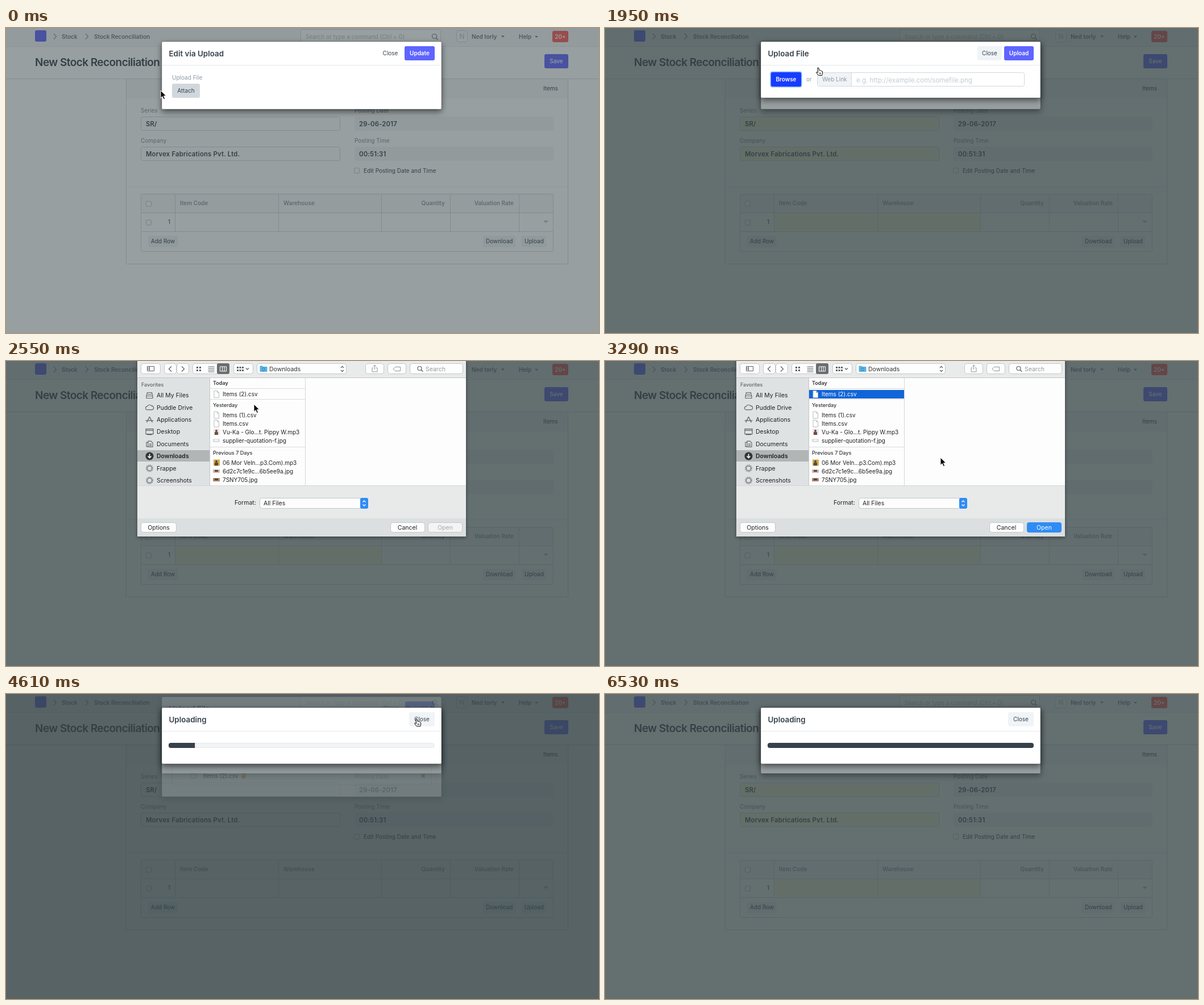
An HTML page that plays this animation: 1043x537 px, repeating every 8 s.

```html
<!DOCTYPE html>
<html lang="en">
<head>
<meta charset="utf-8">
<title>Upload stock items</title>
<style>
html, body { margin: 0; width: 100%; height: 100%; overflow: hidden; background: #fff; }
svg { display: block; width: 100%; height: 100%; }
text { font-family: Inter, "Open Sans", sans-serif; white-space: pre; }
</style>
</head>
<body>
<svg id="stage" viewBox="0 0 1043 537" xmlns="http://www.w3.org/2000/svg"></svg>
<script>
const INK = '#36414c', MUTED = '#8d99a6', LINE = '#d1d8dd', PALE = '#f5f7fa', SOFT = '#f0f4f7', BLUE = '#5e64ff';
const LOOP = 8000;

// drawing helpers; text is placed by its vertical centre
const rect = (x, y, w, h, fill, more = '') => `<rect x="${x}" y="${y}" width="${w}" height="${h}" fill="${fill}" ${more}/>`;
const box = (x, y, w, h, fill = '#fff', stroke = LINE, r = 3) =>
  rect(x + .5, y + .5, w - 1, h - 1, fill, `stroke="${stroke}" rx="${r}"`);
const path = (d, stroke, width = 1, fill = 'none') =>
  `<path d="${d}" stroke="${stroke}" stroke-width="${width}" fill="${fill}"/>`;
const text = (x, y, s, { size = 10, fill = INK, weight = 400, anchor = 'start', more = '' } = {}) =>
  `<text x="${x}" y="${y + size * .36}" font-size="${size}" fill="${fill}" font-weight="${weight}" text-anchor="${anchor}" ${more}>${s}</text>`;
const bold = (x, y, s, o = {}) => text(x, y, s, { weight: 600, ...o });
const group = (id, body, more = '') => `<g id="${id}" ${more}>${body}</g>`;
const hline = (x1, x2, y, c = LINE) => path(`M${x1} ${y}H${x2}`, c);
const vline = (x, y1, y2, c = LINE) => path(`M${x} ${y1}V${y2}`, c);
const caret = (x, y, c, w = 6) => `<path d="M${x} ${y}h${w}l${-w / 2} ${w / 2}z" fill="${c}"/>`;
const check = (x, y) => box(x, y, 10, 10, '#fff', '#b8c2ca', 2);
const button = (x, y, w, label, fill, color = INK, weight = 400, id = '') =>
  rect(x, y, w, 25, fill, `rx="3" ${id && `id="${id}"`}`) +
  text(x + w / 2, y + 12.2, label, { fill: color, weight, anchor: 'middle' });
const lens = (x, y, r, c) => `<circle cx="${x}" cy="${y}" r="${r}" fill="none" stroke="${c}" stroke-width="1.2"/>` +
  path(`M${x + r * .7} ${y + r * .7}l3.4 3.4`, c, 1.4);

function page() {
  const nav = rect(0, 0, 1043, 33, PALE) + hline(0, 1043, 32.5, '#e3e8ec') +
    rect(51, 4, 20, 20, BLUE, 'rx="3"') +
    path('M84 10l4.5 5l-4.5 5M140 10l4.5 5l-4.5 5', MUTED, 1.2) +
    bold(98, 15, 'Stock', { fill: '#6c7680' }) + bold(155, 15, 'Stock Reconciliation', { fill: '#6c7680' }) +
    box(518, 2, 247, 25) + text(527, 15, 'Search or type a command (Ctrl + G)', { fill: '#b3bcc4' }) + lens(753.5, 14.5, 4, '#6c7680') +
    box(792, 4, 20, 21, '#fafbfc') + text(802, 15, 'N', { size: 12, fill: '#b3bcc4', anchor: 'middle' }) +
    bold(819, 15, 'Ned torly', { fill: '#6c7680' }) + caret(871, 13.5, '#6c7680') +
    bold(902, 15, 'Help', { fill: '#6c7680' }) + caret(930, 14, '#6c7680') +
    rect(961, 5, 28, 20, '#ff5858', 'rx="3"') + bold(975, 15, '20+', { fill: '#fff', anchor: 'middle' });
  const head = bold(51, 60, 'New Stock Reconciliation', { size: 19, more: 'letter-spacing="-.55"' }) +
    button(947, 46, 42, 'Save', BLUE, '#fff', 500) + hline(0, 1043, 89.5);
  const card = rect(212, 90, 776, 34, PALE) + path('M211.5 90V415.5H988.5V90', LINE) +
    text(945, 106, 'Items') + hline(212, 988, 279.5, '#ebeff2');
  const value = { size: 11.3, more: 'letter-spacing=".2"' };
  const label = { fill: '#7f8b97' };
  const form = text(237, 145, 'Series', label) + text(237, 198, 'Company', label) +
    text(613, 145, 'Posting Date', label) + text(613, 198, 'Posting Time', label) +
    [156, 209].map(y => box(237, y, 351, 25, 'inherit') + rect(613, y, 350, 25, '#f3f5f8', 'rx="3"')).join('') +
    bold(246, 168.5, 'SR/', value) + bold(246, 222, 'Morvex Fabrications Pvt. Ltd.', value) +
    bold(621, 168.5, '29-06-2017', value) + bold(621, 221.5, '00:51:31', value) +
    check(612, 246) + text(629, 251, 'Edit Posting Date and Time');
  const th = { fill: MUTED };
  const table = rect(237, 293, 726, 32, '#f7f9fb') +
    rect(298, 326, 181, 32, 'inherit') + rect(480, 326, 180, 32, 'inherit') +
    box(237, 292, 726, 102, 'none') + hline(237, 963, 325.5) + hline(237, 963, 358.5) +
    [297.5, 479.5, 660.5, 781.5, 902.5].map(x => vline(x, 292, 358)).join('') +
    check(246, 304.5) + check(246, 337.5) + text(289, 341.5, '1', { anchor: 'end' }) +
    bold(306, 308, 'Item Code', th) + bold(488, 308, 'Warehouse', th) +
    bold(772, 308, 'Quantity', { ...th, anchor: 'end' }) + bold(893, 308, 'Valuation Rate', { ...th, anchor: 'end' }) +
    caret(945, 339, '#b8c2ca', 9) +
    rect(250, 366, 52, 20, SOFT, 'rx="3"') + rect(839, 366, 57, 20, SOFT, 'rx="3"') + rect(907, 366, 43, 20, SOFT, 'rx="3"') +
    text(255, 375.5, 'Add Row') + text(844, 375.5, 'Download') + text(912, 375.5, 'Upload');
  return rect(0, 0, 1043, 537, '#fff') + nav + head + card + form + table;
}

const shade = id => rect(0, 0, 1043, 537, '#334143', `id="${id}" opacity="0"`);
const frame = (title, bottom, id) =>
  rect(274, 24, 492, bottom - 24, '#fff', `id="${id}" rx="2" stroke="#000" stroke-opacity=".25" filter="url(#shadow)"`) +
  bold(286.5, 45, title, { size: 13.4 }) + hline(274, 766, 65.5, '#e3e8ec');

const editModal = () => frame('Edit via Upload', 143, 'editFrame') +
  button(654, 32, 44, 'Close', '#fff') + button(701, 32, 53, 'Update', BLUE, '#fff', 600) +
  text(292, 87, 'Upload File', { fill: MUTED }) + button(292, 98, 49, 'Attach', LINE);

const uploadModal = () => frame('Upload File', 123, 'uploadFrame') +
  button(655, 32, 43, 'Close', SOFT, INK, 400, 'uploadClose') + button(702, 32, 52, 'Upload', BLUE, '#fff', 600) +
  group('pick',
    rect(290.5, 76.5, 56, 28, '#7fb4f5', 'rx="4" id="ring"') + button(292, 78, 53, 'Browse', BLUE, '#fff', 600, 'browse') +
    text(354, 84 + 6.5, 'or', { fill: MUTED }) + box(373, 78, 365, 25) +
    rect(374, 79, 59, 23, SOFT) + vline(433.5, 78, 103) + text(382, 90.5, 'Web Link', { fill: MUTED }) +
    text(442, 91.5, 'e.g. http://example.com/somefile.png', { size: 11.5, fill: '#c5cbd0' })) +
  group('picked',
    button(292, 78, 53, 'Browse', '#7683f4', '#2f3a52') + box(292, 113, 456, 67) + hline(292, 748, 146.5) +
    text(306, 130, 'Public') + text(347, 130, 'Filename') + check(324, 158) + text(347, 163.5, 'Items (2).csv') +
    rect(414.5, 162.5, 7, 5, '#f5a033', 'rx="1"') + path('M416 163v-2a2 2 0 0 1 4 0v2', '#f5a033', 1.3) +
    path('M731 160.5l5.4 5.4m0 -5.4l-5.4 5.4', MUTED, 2.2));

const progressModal = () => frame('Uploading', 123, 'progressFrame') + button(709, 32, 45, 'Close', SOFT) +
  box(286, 86, 468, 9, '#f2f4f5', '#e6eaed', 4) +
  '<clipPath id="track"><rect x="286" y="86" width="468" height="9" rx="4"/></clipPath>' +
  rect(286, 86, 0, 9, INK, 'id="bar" clip-path="url(#track)"');

function fileDialog() {
  const grey = '#5f6366', edge = '#c4c7c8', ui = 10.5;
  const push = (x, y, w, h = 19, fill = '#fdfdfd') => box(x, y, w, h, fill, edge, 4);
  const icons = [
    y => path(`M247 ${y + 1}l1.5 -6h8l1.5 6v4h-11zM247 ${y + 1}h11M249 ${y - 2}h7`, grey, 1.1),
    y => path(`M248.5 ${y + 4}a3 3 0 0 1 0 -6a4 4 0 0 1 7 -1a3.4 3.4 0 0 1 1 7z`, grey, 1.1),
    y => path(`M252.5 ${y - 5}l-5 10M252.5 ${y - 5}l5 10M245.5 ${y + 1.5}h14`, grey, 1.3),
    y => path(`M246 ${y - 5}h13v9h-13zM246 ${y - 2.5}h13M248 ${y + 5}h9`, grey, 1.2),
    y => path(`M250 ${y - 5}h5l3 3v7h-8zM250 ${y - 3}h-3v7.5h3M252 ${y}h4M252 ${y + 2.5}h4`, grey, 1.1),
    y => `<circle cx="252.5" cy="${y}" r="7" fill="#303437"/>` + path(`M252.5 ${y - 4}v7m-3 -3l3 3l3 -3`, '#fff', 1.6),
  ];
  const gear = y => `<circle cx="252.5" cy="${y}" r="5.6" fill="none" stroke="#85898b" stroke-width="2" stroke-dasharray="1.6 1.3"/>` +
    `<circle cx="252.5" cy="${y}" r="4" fill="none" stroke="#85898b" stroke-width="1.5"/>`;
  const places = ['All My Files', 'Puddle Drive', 'Applications', 'Desktop', 'Documents', 'Downloads', 'Frappe', 'Screenshots'];
  const side = rect(231, 30, 127, 190, '#dfe2e3') + rect(231, 157, 127, 20, '#b1b5b6') +
    text(238, 42, 'Favorites', { size: 9, fill: '#606466', weight: 500 }) +
    places.map((s, i) => {
      const y = 60.5 + i * 21.4;
      return (icons[i] || gear)(y) + text(265, y, s, { size: ui, fill: '#222', weight: i === 5 ? 600 : 400 });
    }).join('');
  const sheet = y => path(`M366 ${y - 6}h5.5l3 3v9h-8.5zM371.5 ${y - 6}v3h3`, '#b9bcbe', 1, '#fff');
  const thumb = (c, d) => y => rect(364, y - 3, 12, 6, c, 'rx="1"') + rect(367, y - 2, 6, 3, d);
  const song = (c, d) => y => rect(365, y - 5.5, 11, 11, c) + `<circle cx="370" cy="${y - 2}" r="2" fill="${d}"/>` + rect(367, y, 6, 5, d);
  const files = [
    [95, 'Items (1).csv', sheet], [110, 'Items.csv', sheet],
    [125, 'Vu-Ka - Glo...t. Pippy W.mp3', song('#ece8e6', '#6c4a42')],
    [140, 'supplier-quotation-f.jpg', thumb('#dcdedf', '#f3f3f3')],
    [179, '06 Mor Veln...p3.Com).mp3', song('#d9a640', '#4c4a4a')],
    [194, '6d2c7c1e9c...6b5ee9a.jpg', thumb('#c9b9b3', '#7c3b35')],
    [209, '7SNY705.jpg', thumb('#a98a72', '#5c4033')],
  ];
  const day = (y, s, weight = 500) => text(364, y, s, { size: 9.1, fill: '#333', weight });
  const list = rect(358, 30, 451, 190, '#fdfdfd') + vline(358.5, 30, 220, edge) + vline(526.5, 30, 220, '#d5d7d8') +
    [48.5, 67.5, 151.5].map(y => hline(359, 526, y, '#d9dbdc')).join('') +
    day(39, 'Today', 600) + day(77.5, 'Yesterday') + day(161.5, 'Previous 7 Days') +
    rect(359, 51, 167, 15, '#1165d8', 'id="chosen"') + sheet(58.5) +
    text(381, 58.5, 'Items (2).csv', { fill: '#222', more: 'id="chosenName"' }) +
    files.map(([y, s, icon]) => icon(y) + text(381, y, s, { fill: '#222' })).join('');
  const dots = (x, y, n, s) => Array.from({ length: n * 2 }, (_, i) => rect(x + i % n * s, y + Math.floor(i / n) * 5, 3, 3, grey)).join('');
  const updown = (x, y, c) => path(`M${x - 2.5} ${y - 2}l2.5 -2.5l2.5 2.5M${x - 2.5} ${y + 2}l2.5 2.5l2.5 -2.5`, c, 1.3);
  const bar = rect(231, -20, 578, 50, '#e9ebeb') + hline(231, 809, 29.5, edge) +
    push(237, 4, 35) + path('M248.500 9.500h12v8h-12zM252.500 9.500v8M249 12h3M249 14.500h3', grey) +
    push(278, 4, 22) + push(300, 4, 22) + path('M291 9.500l-4.500 4.500l4.500 4.500', grey, 1.3) + path('M309 9.500l4.500 4.500l-4.500 4.500', grey, 1.3) +
    push(328, 4, 65) + dots(335, 10, 2, 5) + path('M355.500 10h11M355.500 13h11M355.500 16h11M355.500 19h11', grey) +
    rect(371, 4, 22, 19, '#6b6e70', 'rx="3"') + path('M376.500 10h11v8h-11zM380.500 10v8M384 10v8', '#fff') +
    push(400, 4, 35) + dots(406, 10, 3, 4.5) + path('M422 12.500l2.500 2.500l2.500 -2.500', grey, 1.3) +
    push(441, 4, 158) + path('M447 9h4l1 1.500h7v8h-12z', '#3f9fce', .8, '#5cb9e4') + `<circle cx="453" cy="14.500" r="2.500" fill="none" stroke="#2a7fae"/>` +
    text(463, 14, 'Downloads', { size: ui, fill: '#333' }) + updown(591.5, 14, grey) +
    push(632, 4, 33) + path('M646 12h-2v7h9v-7h-2M648.500 15v-8m-2.500 2.500l2.500 -2.500l2.500 2.500', '#8f9395') +
    push(671, 4, 33) + path('M681 14l3.500 -3.500h9v7h-9z', '#8f9395') +
    push(710, 4, 94) + lens(727.5, 13, 3.5, grey) + text(738, 14, 'Search', { size: ui, fill: '#999' });
  const foot = rect(231, 220, 578, 57, '#e8eaea') + rect(231, 277, 578, 32, '#dcdfdf') + hline(231, 809, 219.5, '#d3d6d6') +
    text(402, 249.5, 'Format:', { size: ui, fill: '#222' }) + push(446, 241, 191, 19) +
    rect(623, 241, 14, 19, '#2f8cf5', 'rx="3"') + updown(630, 250.5, '#fff') + text(453, 250.5, 'All Files', { size: ui, fill: '#222' }) +
    push(237, 284, 63, 18) + push(676, 284, 61, 18) + push(742, 284, 61, 18, '#f3f4f4') +
    rect(742, 284, 61, 18, '#2f8cf5', 'rx="4" id="openOn"') +
    [[268.5, 'Options', '#222', ''], [706, 'Cancel', '#222', ''], [772.5, 'Open', '#a5a8a9', 'id="openName"']]
      .map(([x, s, fill, more]) => text(x, 293, s, { size: ui, fill, anchor: 'middle', more })).join('');
  return rect(231, -20, 578, 329, '#e8eaea', 'filter="url(#sheetShadow)"') + bar + side + list + foot;
}

const pointers = {
  arrow: path('M0 0v13.500l3.100 -2.900l2.200 5l2.300 -1l-2.200 -4.900h4.300z', '#fff', 1, '#000'),
  hand: path('M3 .5q1.300 -.7 2 .8l1 4l.8 -.2q1 -.4 1.500 .5q1.300 -.4 1.600 .7q1.300 -.2 1.500 1.200l.2 2.500q0 2 -1 4h-6l-3.800 -4.500q-.6 -1.500 .8 -1.500l1.900 1.200z', '#000', 1, '#fff') +
    path('M6.500 9v3M8.500 9v3', '#000', .8),
  beam: path('M-2.500 -6q2.500 0 2.500 1.500q0 -1.500 2.500 -1.500M0 -4.500v9M-2.500 6q2.500 0 2.500 -1.500q0 1.500 2.500 1.500M-1.500 1.500h3', '#000', 1.1),
};

const filter = (id, dy, blur, alpha) => `<filter id="${id}" x="-10%" y="-30%" width="120%" height="170%">` +
  `<feDropShadow dx="0" dy="${dy}" stdDeviation="${blur}" flood-color="#000" flood-opacity="${alpha}"/></filter>`;

document.getElementById('stage').innerHTML =
  `<defs>${filter('shadow', 4, 5.5, .55)}${filter('sheetShadow', 2, 3, .4)}</defs>` +
  group('page', page()) + shade('shade1') + group('edit', editModal()) +
  shade('shade2') + group('upload', uploadModal()) +
  shade('shade3') + group('progress', progressModal()) +
  group('dialog', fileDialog()) +
  group('pointer', Object.entries(pointers).map(([k, v]) => group(k, v)).join(''));

// pointer stops: time, x, y, kind
const stops = [
  [0, 272, 110, 'arrow'], [150, 260, 128, 'arrow'], [300, 249.5, 145, 'arrow'], [450, 297, 110, 'hand'],
  [750, 372, 100, 'arrow'], [900, 440, 80, 'beam'], [1050, 430, 84, 'arrow'], [1200, 380, 88, 'arrow'],
  [1350, 330, 88, 'hand'], [1500, 312, 90, 'hand'], [1800, 340, 82, 'hand'], [1950, 371, 69.5, 'hand'],
  [2100, 400, 66, 'arrow'], [2250, 418, 68, 'arrow'], [2400, 432, 72, 'arrow'], [2550, 436, 76, 'arrow'],
  [2700, 426, 57.5, 'arrow'], [2850, 425.5, 56.5, 'arrow'], [3285, 590, 170, 'arrow'], [3430, 768, 288, 'arrow'],
  [3580, 768, 260, 'arrow'], [3726, 747, 138, 'arrow'], [3873, 738, 90, 'arrow'], [4020, 724, 46, 'hand'],
  [4170, 720, 44, 'hand'], [4320, 718, 43, 'hand'], [4900, 740, 120, 'arrow'], [5045, 770, 220, 'arrow'],
  [5190, 790, 290, 'arrow'], [5340, 798, 317, 'arrow'], [6240, 850, 420, 'arrow'], [6390, 921, 508, 'arrow'],
  [6530, 1100, 600, 'arrow'],
];

const el = {};
document.querySelectorAll('[id]').forEach(n => el[n.id] = n);
const set = (id, attrs) => { for (const k in attrs) el[id].setAttribute(k, attrs[k]); };
const show = (id, on) => set(id, { display: on ? 'inline' : 'none' });
const place = (id, x, y) => set(id, { transform: `translate(${x} ${y})` });
const part = (t, start, length) => Math.min(1, Math.max(0, (t - start) / length));

function bezier(x1, y1, x2, y2) {
  const at = (a, b, u) => 3 * a * u * (1 - u) ** 2 + 3 * b * u * u * (1 - u) + u ** 3;
  return p => {
    let lo = 0, hi = 1;
    for (let i = 0; i < 20; i++) {
      const mid = (lo + hi) / 2;
      if (at(x1, x2, mid) < p) lo = mid; else hi = mid;
    }
    return p >= 1 ? 1 : at(y1, y2, lo);
  };
}
const ease = bezier(.25, .1, .25, 1), easeOut = bezier(0, 0, .58, 1);

function snap(t) {
  if (t < 2850) return Math.floor(t / 150) * 150;
  if (t < 3140) return 2850;
  const step = 2200 / 15;
  return 3140 + Math.floor((t - 3140) / step + .001) * step;
}

function draw(time) {
  const t = snap(time);
  const picked = t > 3500;

  set('page', { fill: t >= 750 && !(t > 4550 && t < 4700) ? '#fffce0' : '#fff' });
  set('shade1', { opacity: .5 });
  set('shade2', { opacity: .5 * part(t, 600, 300) });
  set('shade3', { opacity: .25 * Math.max(0, 1 - Math.abs(t - 4606) / 220) });
  set('editFrame', { height: t > 4400 ? 116 : 119 });

  const leave = part(t, 4520, 300);
  show('upload', t >= 750 && t < 4700);
  place('upload', 0, -25 * (1 - easeOut(part(t, 735, 300))) - 44 * easeOut(leave));
  set('upload', { opacity: Math.min(part(t, 735, 150), 1 - part(t, 4520, 115)) });
  set('uploadFrame', { height: picked ? 176 : 99 });
  set('uploadClose', { fill: picked ? '#fff' : SOFT });
  set('browse', { fill: t >= 1650 ? '#173cff' : BLUE });
  show('ring', t >= 1650);
  show('pick', !picked);
  show('picked', picked);

  show('progress', t > 4400);
  place('progress', 0, -25 * (1 - easeOut(part(t, 4400, 200))));
  set('progress', { opacity: part(t, 4400, 150) });
  set('bar', { width: 468 * ease(part(t, 4540, 650)) });

  const chosen = t >= 3140;
  show('dialog', t > 2150 && t < 3700);
  place('dialog', 0, -320 * (1 - easeOut(part(t, 2150, 380)) + part(t, 3500, 170) ** 2));
  show('chosen', chosen);
  show('openOn', chosen);
  set('chosenName', { fill: chosen ? '#fff' : '#222' });
  set('openName', { fill: chosen ? '#fff' : '#a5a8a9' });

  const [, x, y, kind] = stops.filter(s => s[0] <= time).pop();
  place('pointer', x, y);
  for (const k in pointers) show(k, k === kind);
}

const begin = performance.now();
function tick() {
  draw((performance.now() - begin) % LOOP);
  requestAnimationFrame(tick);
}
tick();
</script>
</body>
</html>
```
